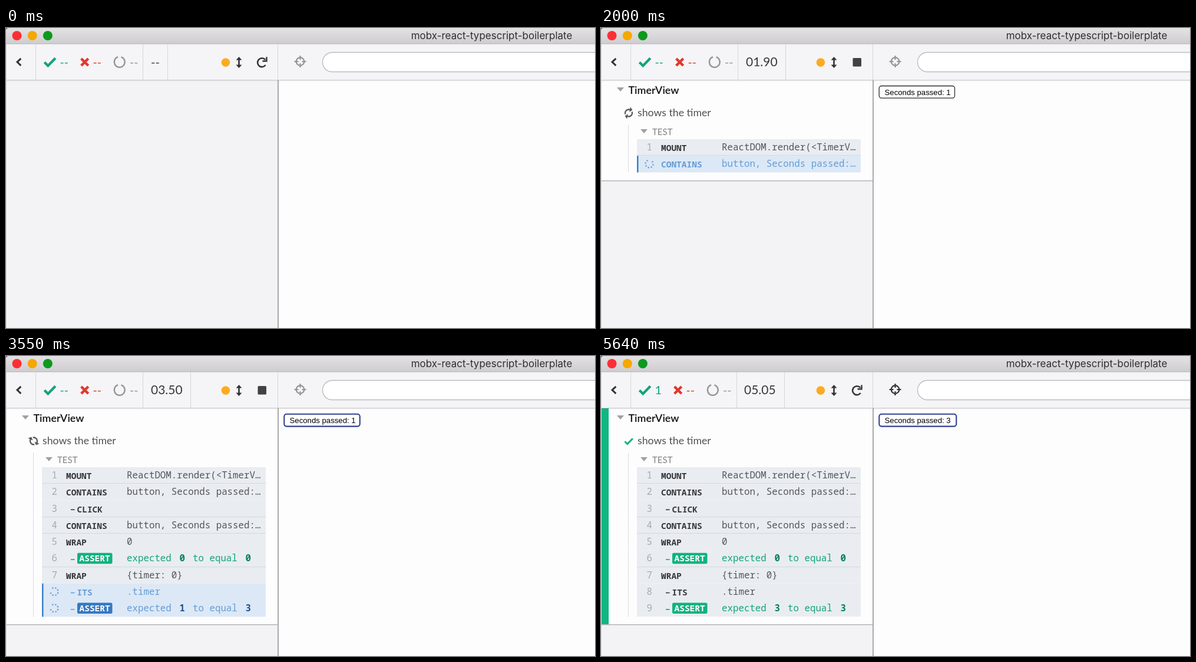
Write an HTML page with a canvas that moves like this. It is 1000 px wide and 510 px high and loops after 5730 ms.

```html
<!DOCTYPE html>
<html lang="en">
<head>
<meta charset="utf-8">
<title>Test runner</title>
<style>
html, body { margin: 0; width: 100%; height: 100%; overflow: hidden; background: #fff; }
canvas { display: block; }
</style>
</head>
<body>
<canvas id="stage" width="1000" height="510"></canvas>
<script>
const ctx = document.getElementById('stage').getContext('2d');
const LOOP = 5730, STEP = LOOP / 63;
const START = 85, CLICK = 2180, DONE = 5180;
const SANS = 'Lato, sans-serif';
const MONO = '"Noto Sans Mono", "DejaVu Sans Mono", monospace';
const GREEN = '#13a47a', RED = '#e2382d', DARK = '#343436', GRAY = '#959597';
const WHITE = '#fefdfe';
const ROW_TOP = 189, ROW_H = 28.25;

const rowsAt = secs => [
  { name: 'MOUNT', arg: 'ReactDOM.render(<TimerV…' },
  { name: 'CONTAINS', arg: 'button, Seconds passed:…' },
  { name: 'CLICK', arg: '', child: true },
  { name: 'CONTAINS', arg: 'button, Seconds passed:…' },
  { name: 'WRAP', arg: '0' },
  { name: 'ASSERT', values: [0, 0], child: true },
  { name: 'WRAP', arg: '{timer: 0}' },
  { name: 'ITS', arg: '.timer', child: true },
  { name: 'ASSERT', values: [secs, 3], child: true }
];

function rect(x, y, w, h, color) {
  ctx.fillStyle = color;
  ctx.fillRect(x, y, w, h);
}

function box(x, y, w, h, r, fill, stroke, lw) {
  ctx.beginPath();
  ctx.roundRect(x, y, w, h, r);
  if (fill) { ctx.fillStyle = fill; ctx.fill(); }
  if (stroke) { ctx.strokeStyle = stroke; ctx.lineWidth = lw; ctx.stroke(); }
}

function dot(x, y, r, color) {
  ctx.fillStyle = color;
  ctx.beginPath();
  ctx.arc(x, y, r, 0, 7);
  ctx.fill();
}

function ring(x, y, r, a, b, color, lw) {
  ctx.strokeStyle = color;
  ctx.lineWidth = lw;
  ctx.beginPath();
  ctx.arc(x, y, r, a, b);
  ctx.stroke();
}

function line(points, color, lw) {
  ctx.strokeStyle = color;
  ctx.lineWidth = lw;
  ctx.beginPath();
  points.forEach(([x, y]) => ctx.lineTo(x, y));
  ctx.stroke();
}

function poly(points, color) {
  ctx.fillStyle = color;
  ctx.beginPath();
  points.forEach(([x, y]) => ctx.lineTo(x, y));
  ctx.fill();
}

function text(str, x, y, font, color, align = 'left') {
  ctx.font = font;
  ctx.fillStyle = color;
  ctx.textAlign = align;
  ctx.fillText(str, x, y);
}

const caret = (x, y) => poly([[x - 6, y - 3], [x + 6, y - 3], [x, y + 4]], '#a0a0a2');

const check = (x, y, s, color, lw) =>
  line([[x - 9 * s, y + s], [x - 3 * s, y + 7 * s], [x + 9.5 * s, y - 6 * s]], color, lw);

function titleBar() {
  const g = ctx.createLinearGradient(0, 0, 0, 27);
  g.addColorStop(0, '#e4e2e4');
  g.addColorStop(1, '#cecccf');
  rect(0, 0, 1000, 27, g);
  rect(0, 26.5, 1000, 1, '#b6b4b6');
  poly([[0, 0], [3, 0], [0, 3]], '#6c6c70');
  ['#fc2f35', '#f5a800', '#0b9a1d'].forEach((c, i) => dot(18.5 + i * 26.2, 13, 8, c));
  text('mobx-react-typescript-boilerplate', 824.5, 19.3, '17px Inter, sans-serif', '#2f2e30', 'center');
}

function reload(x, y) {
  ring(x, y, 7.4, 0.6, 5.6, DARK, 2.6);
  line([[x + 8, y - 9.5], [x + 8, y - 2.5], [x + 1, y - 2.5]], DARK, 2.4);
}

function scrollIcon(x, y) {
  rect(x - 1.3, y - 6, 2.6, 12, DARK);
  for (const s of [-1, 1]) poly([[x - 5, y + 4 * s], [x + 5, y + 4 * s], [x, y + 9.5 * s]], DARK);
}

function crosshair(x, y, color) {
  ring(x, y, 6.8, 0, 7, color, 2.2);
  for (const [dx, dy] of [[1, 0], [-1, 0], [0, 1], [0, -1]])
    line([[x + dx * 3, y + dy * 3], [x + dx * 10, y + dy * 10]], color, 2.2);
}

function toolbar(t, running, done) {
  rect(0, 28, 1000, 60, '#f5f4f6');
  const count = '19.5px ' + SANS;
  const shift = done ? -3 : 0;
  const started = running || done;
  const tenths = Math.floor((t - 30) / 100);
  const clock = done ? '05.05' : running && tenths > 0 ? (tenths / 10).toFixed(2).padStart(5, '0') : '--';
  const wide = clock !== '--';

  line([[25.3, 51.8], [19, 57.8], [25.3, 63.8]], DARK, 3);
  check(74.3, 57.2, 1, GREEN, 4.3);
  text(done ? '1' : '--', 91.5, 65.2, done ? '20px ' + SANS : count, GREEN);
  const cx = 133.7 + shift, cy = 58;
  for (const s of [-1, 1]) line([[cx - 6, cy - 6 * s], [cx + 6, cy + 6 * s]], RED, 4.4);
  text('--', 147.5 + shift, 65.2, count, RED);
  ring(192.8 + shift, 57.8, 9, -1.25, 4.4, GRAY, 2.5);
  text('--', 210 + shift, 65.2, count, GRAY);
  text(clock, 246 + shift, wide ? 65 : 64.5, (wide ? '21px ' : '20px ') + SANS, '#39393b');
  for (const x of [50, 232 + shift * 0.8, (wide ? 313 : 274) + shift * 0.8, 461])
    rect(Math.round(x), 28, 1, 60, '#d6d5d8');

  dot(372.9, 58.6, 7.3, '#fcab1f');
  scrollIcon(395.5, 58.5);
  if (started && !done) box(427.5, 51, 14.5, 14.5, 1.5, '#424244');
  else reload(434.5, 58.7);

  crosshair(499.5, 57, done ? DARK : GRAY);
  box(537.5, 41.5, 500, 33, 16.5, '#fff', '#bdbcbe', 1.4);
}

function syncIcon(x, y, angle) {
  ctx.save();
  ctx.translate(x, y);
  ctx.rotate(angle);
  for (let i = 0; i < 2; i++) {
    ring(0, 0, 6, 3.35, 5.75, '#58585a', 2.3);
    poly([[8, -7], [8, -0.8], [1.8, -0.8]], '#58585a');
    ctx.rotate(Math.PI);
  }
  ctx.restore();
}

function spinner(x, y, angle) {
  for (let i = 0; i < 7; i++) {
    const a = angle + i * Math.PI / 4;
    dot(x + 6.5 * Math.cos(a), y + 6.5 * Math.sin(a), 1.3, '#6a9fd6');
  }
}

function drawRow(row, i, pending, angle) {
  const y = ROW_TOP + i * ROW_H;
  const arg = '15.8px ' + MONO, strong = '600 15.8px ' + MONO, label = '600 14.5px ' + MONO;
  rect(61, y, 380, ROW_H, pending ? '#dce8f6' : '#e9edf1');
  if (i && !row.child) rect(61, Math.round(y) - 1, 380, 1, '#d3d8dd');
  if (pending) {
    rect(61, y, 2.5, ROW_H, '#3b7ec6');
    spinner(82, y + 13.8, angle);
  } else {
    text(i + 1, 87, y + 19, arg, '#a6abb0', 'right');
  }

  const isAssert = !!row.values;
  const tone = pending ? '#659cd5' : isAssert ? '#12a677' : '#555659';
  const nameTone = pending ? tone : isAssert ? tone : '#36373a';
  if (row.child) rect(110, y + 15, 6.5, 1.6, nameTone);
  if (isAssert) {
    box(121, y + 4.5, 59.5, 18.5, 2.5, pending ? '#3679c2' : '#0fb37f');
    text(row.name, 124.5, y + 19.2, label, '#fff');
    const bold = pending ? '#1d5596' : '#08805a';
    text('expected', 205, y + 19, arg, tone);
    text(row.values[0], 294.5, y + 19, strong, bold);
    text('to equal', 317, y + 19, arg, tone);
    text(row.values[1], 406.5, y + 19, strong, bold);
  } else {
    text(row.name, row.child ? 120.5 : 102, y + 20, label, nameTone);
    text(row.arg, 205, y + 19, arg, tone);
  }
}

function panel(t, secs, done) {
  const clicked = t >= CLICK;
  const count = clicked ? 9 : 2;
  const bottom = ROW_TOP + count * ROW_H;
  const end = Math.floor(bottom + 13.6);
  const angle = (t - CLICK) / 2000 * Math.PI * 2;

  rect(0, 88, 461, end - 88, WHITE);
  rect(0, end, 461, 1, '#b4b4b7');
  rect(0, end + 1, 461, 1, '#d4d4d8');
  if (done) rect(1, 89, 12, end - 89, '#0fb783');

  caret(33, 104);
  text('TimerView', 46.5, 112, '600 17.9px ' + SANS, '#111');
  if (done) check(47, 144.5, 0.72, '#0fb37f', 3);
  else syncIcon(47, 144.5, angle);
  text('shows the timer', 62, 150, '17.7px ' + SANS, '#505053');
  caret(73, 175);
  text('TEST', 87, 181.5, '15px ' + SANS, '#808083');
  for (let y = 165; y < bottom; y += 3) rect(46, y, 1, 1.4, '#b4b4b7');

  rowsAt(secs).slice(0, count).forEach((row, i) =>
    drawRow(row, i, !done && i >= (clicked ? 7 : 1), angle));
}

function timerButton(secs, focused) {
  const w = secs === 1 ? 129 : 131.5;
  if (focused) box(472.3, 98.8, w - 0.5, 20.8, 4, '#fff', '#303f92', 2.1);
  else box(472.2, 98.5, w - 0.7, 20.6, 4, '#fff', '#2a2a2c', 1.3);
  text('Seconds passed: ' + secs, 481.5, 114.3, '13.2px "Liberation Sans", Arial, sans-serif', '#000');
}

function draw(t) {
  const done = t >= DONE, running = t >= START && !done;
  const clicked = t >= CLICK;
  const secs = Math.floor((t - 80) / 1000) - (clicked ? 2 : 0);

  rect(0, 0, 1000, 510, WHITE);
  rect(0, 88, 461, 422, '#f3f2f5');
  if (running || done) {
    panel(t, secs, done);
    timerButton(secs, clicked);
  }
  rect(461, 88, 2, 422, '#a9a9ab');
  toolbar(t, running, done);
  titleBar();
  rect(0, 88, 1000, 1, '#cbcacd');
  rect(0, 89, 1000, 1, 'rgba(0,0,0,.07)');
  rect(0, 90, 1000, 1, 'rgba(0,0,0,.03)');
  rect(0, 28, 1, 482, '#dcdbde');
}

const origin = performance.now();

function tick() {
  const t = (performance.now() - origin) % LOOP;
  draw(Math.floor((t + 4) / STEP) % 63 * STEP);
  requestAnimationFrame(tick);
}

tick();
</script>
</body>
</html>
```
